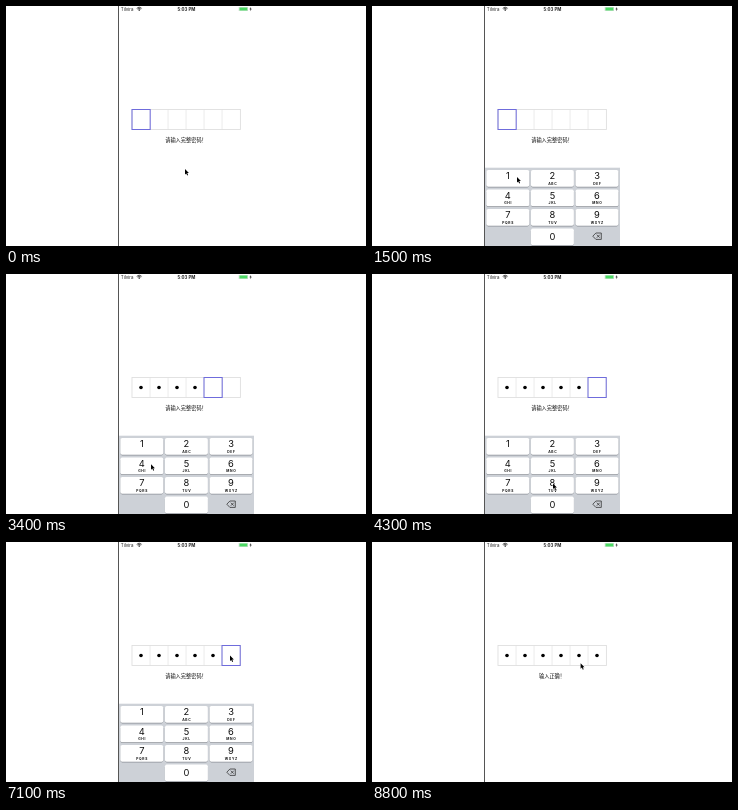
An HTML page with a canvas for the animation above (8.9 s loop, 360 by 240 pixels).

```html
<!DOCTYPE html>
<html lang="zh-CN">
<head>
<meta charset="utf-8">
<style>
html, body { margin: 0; width: 100%; height: 100%; overflow: hidden; background: #fff; }
canvas { display: block; width: 360px; height: 240px; }
</style>
</head>
<body>
<canvas id="stage"></canvas>
<script>
const LOOP = 8900, STEP = 100;
const canvas = document.getElementById('stage');
const ctx = canvas.getContext('2d');
const ratio = window.devicePixelRatio || 1;
canvas.width = 360 * ratio;
canvas.height = 240 * ratio;

const LATIN = 'Inter, "Liberation Sans", sans-serif';
const CHINESE = '"Noto Sans CJK SC", "Noto Sans CJK", sans-serif';
const LETTERS = ['', 'ABC', 'DEF', 'GHI', 'JKL', 'MNO', 'PQRS', 'TUV', 'WXYZ'];
const CELL = 18, HOLD = 95, ERASED = 7100;

// The first code is typed a little slower with each key, the second only retypes its end.
const taps = [1, 2, 3, 4, 5, 8].map((key, i) => ({ key, time: 1700 + 505 * i + 20 * i * i }));
taps.push({ key: 6, time: 8090 });

const column = n => (n - 1) % 3;
const row = n => Math.floor((n - 1) / 3);
const keyTip = n => [145 + 36 * column(n), 171 + 19.2 * row(n)];

const moves = [
  { at: 400, span: 400, to: [140, 112] },
  ...taps.slice(0, 6).map(({ key }, i) => i
    ? { at: taps[i - 1].time, span: 260, to: keyTip(key) }
    : { at: 900, span: 500, to: keyTip(key) }),
  { at: 5300, span: 500, to: [224, 113.5] },
  { at: 7300, span: 600, to: keyTip(6) },
  { at: 8750, span: 50, to: [208.6, 121.2] }
];

function smooth(u) {
  u = Math.min(1, Math.max(0, u));
  return u * u * (3 - 2 * u);
}
const ease = (t, at, span) => smooth((t - at) / span);

// Each toggle raises or lowers the keyboard in turn.
const keyboardShown = t => [780, 4780, 5950, 8080]
  .reduce((sum, at, i) => sum + ease(t, at, 500) * (i % 2 ? -1 : 1), 0);

function text(str, x, y, size, { weight = 400, align = 'center', family = LATIN, spacing = 0 } = {}) {
  ctx.font = `${weight} ${size}px ${family}`;
  ctx.textAlign = align;
  ctx.letterSpacing = spacing + 'px';
  ctx.fillText(str, x + spacing / 2, y);
}

function roundBox(x, y, w, h, r, color) {
  ctx.fillStyle = color;
  ctx.beginPath();
  ctx.roundRect(x, y, w, h, r);
  ctx.fill();
}

function outline(x, y, w, h, color, width) {
  ctx.strokeStyle = color;
  ctx.lineWidth = width;
  ctx.strokeRect(x, y, w, h);
}

function dot(x, y, r) {
  ctx.beginPath();
  ctx.arc(x, y, r, 0, 7);
  ctx.fill();
}

const shape = d => new Path2D(d);
const BOLT = shape('M245 1 L243.4 3.3 H244.5 L244 5.2 L245.8 2.7 H244.7 Z');
const ERASE = shape('M220.8 230.2 L223.9 227 H229.3 V233.4 H223.9 Z M224.8 228.7 l3 3 m0 -3 l-3 3');
const ARROW = shape('M0 0 V5.5 L1.3 4.4 L2.2 6.5 L3.1 6.1 L2.2 4.1 L3.9 4 Z');

function drawStatus() {
  ctx.fillStyle = '#222';
  text('Tilvira', 114.8, 4.9, 4.4, { align: 'left' });
  text('5:03 PM', 180.4, 4.9, 4.4, { weight: 700 });
  ctx.strokeStyle = '#222';
  ctx.lineWidth = 0.8;
  for (const r of [2.2, 3.4]) {
    ctx.beginPath();
    ctx.arc(133.2, 4.7, r, -Math.PI * 0.76, -Math.PI * 0.24);
    ctx.stroke();
  }
  dot(133.2, 4.1, 0.8);
  outline(233, 1.2, 8.8, 3.6, '#b5c4b8', 0.4);
  roundBox(233.4, 1.5, 8, 3, 0.4, '#4cd964');
  ctx.fillStyle = '#222';
  ctx.fill(BOLT);
}

function drawField(count) {
  for (let i = 1; i < 6; i++) {
    ctx.fillStyle = '#e9e9e9';
    ctx.fillRect(125.6 + CELL * i, 103.5, 0.9, 20);
  }
  outline(126, 103.5, 6 * CELL + 0.4, 20, '#dfdfdf', 0.9);
  ctx.fillStyle = '#000';
  for (let i = 0; i < count; i++) dot(135 + CELL * i, 113.5, 1.8);
  if (count < 6) outline(126 + CELL * count, 103.5, CELL + 0.2, 20, '#6f6cdc', 1);
}

function drawKey(n, col, line, pressed) {
  const x = 114.3 + 44.6 * col, y = 164 + 19.5 * line;
  roundBox(x, y + 0.6, 43, 16.8, 1.8, '#8c9097');
  roundBox(x, y, 43, 16.8, 1.8, pressed ? '#b0bac8' : '#fff');
  ctx.fillStyle = '#111';
  text(n, x + 21.5, n ? y + 9.4 : y + 11.6, 9.3);
  if (n) text(LETTERS[n - 1], x + 21.5, y + 14.5, 3.3, { weight: 700, spacing: 0.7 });
}

function drawKeyboard(t, shown) {
  ctx.save();
  ctx.translate(0, 78.3 * (1 - shown));
  ctx.fillStyle = '#cdd1d7';
  ctx.fillRect(112.5, 161.7, 135.5, 79);
  const held = taps.find(({ time }) => t >= time - HOLD && t < time);
  for (let n = 1; n <= 9; n++) drawKey(n, column(n), row(n), held && held.key === n);
  drawKey(0, 1, 3);
  ctx.strokeStyle = '#222';
  ctx.lineWidth = 0.7;
  ctx.stroke(ERASE);
  ctx.restore();
}

function drawPointer(t) {
  let [x, y] = [179, 163];
  for (const { at, span, to } of moves) {
    const u = ease(t, at, span);
    x += (to[0] - x) * u;
    y += (to[1] - y) * u;
  }
  ctx.save();
  ctx.translate(x, y);
  ctx.strokeStyle = '#fff';
  ctx.lineWidth = 0.8;
  ctx.stroke(ARROW);
  ctx.fillStyle = '#000';
  ctx.fill(ARROW);
  ctx.restore();
}

function draw(t) {
  ctx.setTransform(ratio, 0, 0, ratio, 0, 0);
  ctx.fillStyle = '#fff';
  ctx.fillRect(0, 0, 360, 240);

  const count = taps.filter(({ time }) => time <= t).length - (t >= ERASED ? 1 : 0);
  const message = count < 6 ? '请输入完整密码！' : t < ERASED ? '输入错误！' : '输入正确！';

  drawStatus();
  drawField(count);
  ctx.fillStyle = '#111';
  text(message, 180, 135.6, 5.2, { family: CHINESE, weight: 500 });
  drawKeyboard(t, keyboardShown(t));
  ctx.fillStyle = '#555';
  ctx.fillRect(112, 0, 1, 240);
  drawPointer(t);
}

const start = performance.now();
function frame() {
  const t = (performance.now() - start) % LOOP;
  draw(Math.floor(t / STEP) * STEP);
  requestAnimationFrame(frame);
}
frame();
</script>
</body>
</html>
```
